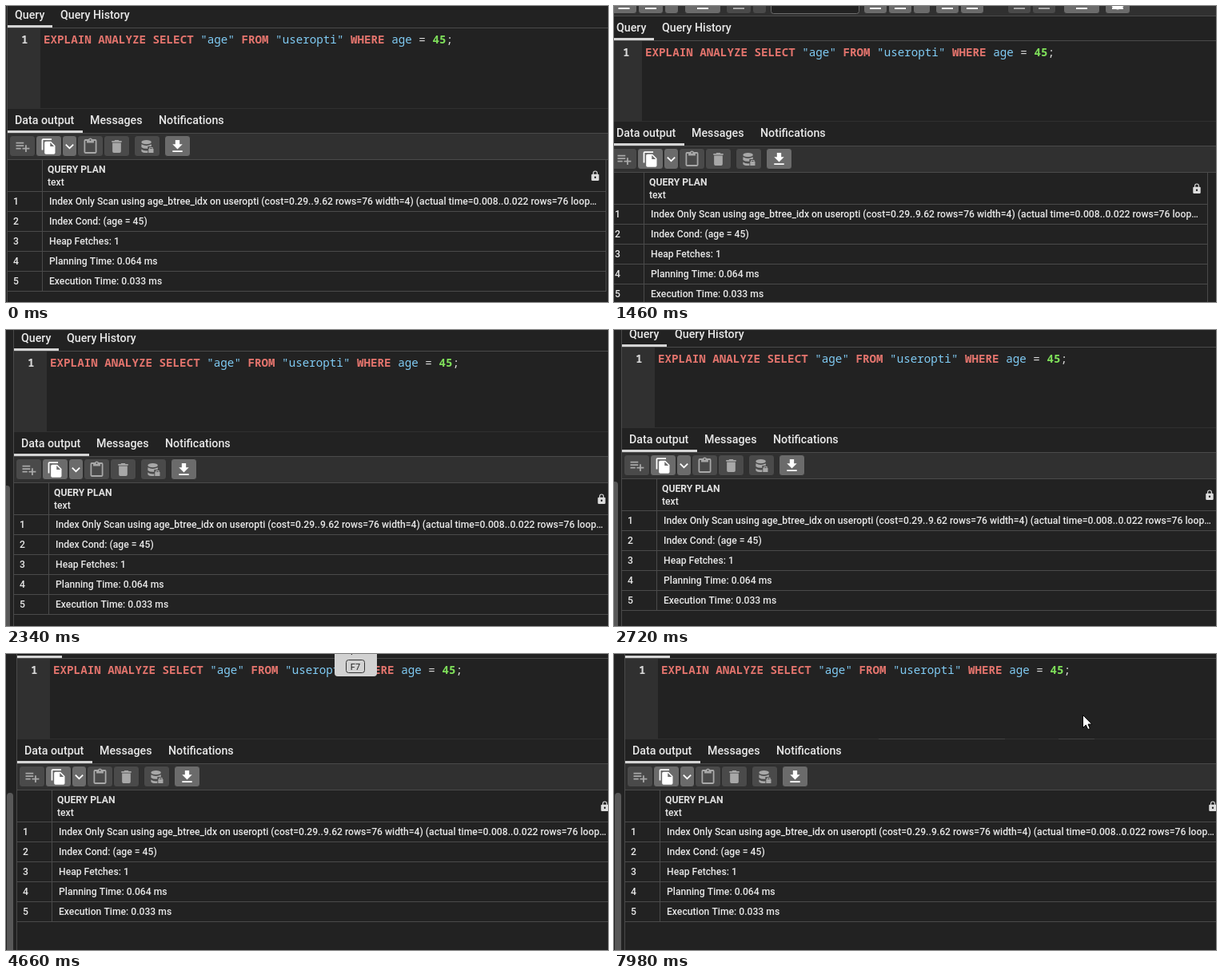
Animation of 753 by 371 pixels, one loop 8000 ms. Source, as an HTML page with a canvas:

```html
<!DOCTYPE html>
<html>
<head>
<meta charset="utf-8">
<style>
  html, body { margin: 0; width: 100%; height: 100%; overflow: hidden; background: #222; }
  canvas { display: block; }
</style>
</head>
<body>
<canvas id="stage" width="753" height="371"></canvas>
<script>
const ctx = document.getElementById('stage').getContext('2d');
const LOOP = 8000;
const SANS = 'Roboto, sans-serif';
const MONO = '"Noto Sans Mono", monospace';
const TAB_SIZE = 14.22, GRID_SIZE = 12.17;
const LINE = '#4a4a4a', BAR = '#303030', EDGE = '#2e2e2e', ACTIVE = '#6b6b6b', DISABLED = '#4a4a4a';
const KEYWORD = '#e3746d', NAME = '#80ccf5', NUMBER = '#7fe05a', PLAIN = '#d8d8d8';

// Each entry holds from its start time until the next one.
const pan = [
  [0, 0, 0], [1460, -8, 16], [1890, -3, 9], [2040, 4, 2],
  [2340, 8, -1], [2720, 8, -6], [2860, 11, -15], [2980, 12, -22]
];
const pointer = [
  [0], [290, 'arrow', 252, -2], [450, 'arrow', 227, 0], [580],
  [730, 'arrow', 238, -12], [880],
  [6550, 'move', 475.5, 134.5], [6690, 'arrow', 477, 182], [6830, 'arrow', 440, 90],
  [6960, 'arrow', 404, -3], [7080, 'arrow', 500, 30], [7200, 'arrow', 588, 92], [7320],
  [7460, 'arrow', 585, 149], [7580, 'move', 566, 133], [7700], [7980, 'arrow', 586, 76]
];
const tooltip = [
  [0], [4660, 411, 53, 'Explain', 'F7'], [4950], [5080, 330, 94, 'Execute query', 'F5'], [6550]
];
const at = (track, t) => track.filter(entry => entry[0] <= t).pop();

const rows = [
  'Index Only Scan using age_btree_idx on useropti (cost=0.29..9.62 rows=76 width=4) (actual time=0.008..0.022 rows=76 loop…',
  'Index Cond: (age = 45)',
  'Heap Fetches: 1',
  'Planning Time: 0.064 ms',
  'Execution Time: 0.033 ms'
];
const code = [
  ['EXPLAIN ANALYZE SELECT ', KEYWORD, 700], ['"age" ', NAME], ['FROM ', KEYWORD, 700],
  ['"useropti" ', NAME], ['WHERE ', KEYWORD, 700], ['age ', NAME], ['= ', PLAIN],
  ['45', NUMBER, 700], [';', PLAIN]
];
// Filled outlines in a 24 by 24 box
const icons = {
  addRow: 'M14 10H3v2h11zM14 6H3v2h11zM18 14v-4h-2v4h-4v2h4v4h2v-4h4v-2zM3 16h7v-2H3z',
  copy: 'M16 1H4Q2 1 2 3V17H4V3H16ZM15 5L21 11V21Q21 23 19 23H8Q6 23 6 21V7Q6 5 8 5ZM14 12H19.5L14 6.5Z',
  chevron: 'M7.4 8.6L12 13.2L16.6 8.6L18 10L12 16L6 10Z',
  paste: 'M19 2H14.8A3 3 0 0 0 9.2 2H5Q3 2 3 4V20Q3 22 5 22H19Q21 22 21 20V4Q21 2 19 2ZM12 2A1 1 0 0 1 12 4A1 1 0 0 1 12 2ZM19 20H5V4H7V7H17V4H19Z',
  trash: 'M6 19Q6 21 8 21H16Q18 21 18 19V7H6ZM19 4H15.5L14.5 3H9.5L8.5 4H5V6H19Z',
  database: 'M4 6A7 3 0 0 1 18 6A7 3 0 0 1 4 6ZM4 9Q11 13 18 9V12H13V15Q7 15.5 4 13ZM4 16Q7 18.5 13 18V21Q6 21.5 4 19ZM14 15.5H15V13H20V15.5H21V21H14ZM16.2 15.5H18.8V14.2H16.2Z',
  download: 'M19 9H15V3H9V9H5L12 16ZM5 18V20H19V18Z',
  lock: 'M18 8H17V6A5 5 0 0 0 7 6V8H6Q4 8 4 10V20Q4 22 6 22H18Q20 22 20 20V10Q20 8 18 8ZM12 17A2 2 0 0 1 12 13A2 2 0 0 1 12 17ZM15.1 8H8.9V6A3.1 3.1 0 0 1 15.1 6Z'
};
// Left, width, icon, enabled
const buttons = [
  [4, 33, 'addRow', 0], [37, 33, 'copy', 1], [70, 19, 'chevron', 1], [89, 33, 'paste', 0],
  [122, 33, 'trash', 0], [160, 33, 'database', 0], [198, 33, 'download', 1]
];
const topButtons = [
  [4, 33, 1], [38, 32, 1], [71, 18, 1], [96, 46, 1], [148, 32, 0], [181, 18, 0],
  [320, 30, 1], [351, 30, 1], [382, 22, 1], [410, 30, 1], [441, 30, 1],
  [500, 30, 0], [531, 30, 0], [570, 46, 1], [622, 32, 1]
];
const arrowPath = new Path2D('M.5 .5V16.5L4.3 13L6.8 18.6L9.4 17.5L7 12H11.8Z');
const movePath = new Path2D('M0 -10.5L4 -6H1.5V-1.5H6V-4L10.5 0L6 4V1.5H1.5V6H4L0 10.5L-4 6H-1.5V1.5H-6V4L-10.5 0L-6 -4V-1.5H-1.5V-6H-4Z');

function rect(x, y, w, h, color) {
  ctx.fillStyle = color;
  ctx.fillRect(x, y, w, h);
}

function roundRect(x, y, w, h, r, fill, stroke) {
  ctx.beginPath();
  ctx.roundRect(x, y, w, h, r);
  if (fill) { ctx.fillStyle = fill; ctx.fill(); }
  if (stroke) { ctx.strokeStyle = stroke; ctx.lineWidth = 1; ctx.stroke(); }
}

function text(str, x, y, size, color = '#e8e8e8', weight = 500, family = SANS, align = 'left') {
  ctx.font = `${weight} ${size}px ${family}`;
  ctx.fillStyle = color;
  ctx.textAlign = align;
  ctx.fillText(str, x, y);
}

function icon(name, x, y, color, size = 21.33) {
  ctx.save();
  ctx.translate(x, y);
  ctx.scale(size / 24, size / 24);
  ctx.translate(-12, -12);
  ctx.fillStyle = color;
  ctx.fill(new Path2D(icons[name]), 'evenodd');
  ctx.restore();
}

function button(x, y, w, enabled) {
  roundRect(x + .5, y + .5, w - 1, 26, 3.5, enabled ? ACTIVE : DISABLED, EDGE);
}

function drawTopBar() {
  rect(2, -50, 760, 46, BAR);
  rect(2, -4, 760, 1, LINE);
  for (const [x, w, enabled] of topButtons) {
    button(x, -33, w, enabled);
    const color = enabled ? '#fff' : '#a8a8a8';
    if (w < 25) icon('chevron', x + w / 2, -20, color);
    else rect(x + w / 2 - 7, -14, 14, 2, color);
  }
  roundRect(204.5, -33.5, 110, 27, 3, '#222', ACTIVE);
  ctx.beginPath();
  ctx.arc(638, -20, 8.5, 0, 7);
  ctx.fillStyle = '#fff';
  ctx.fill();
}

function drawEditor() {
  text('Query', 11, 16, TAB_SIZE);
  text('Query History', 68, 16, TAB_SIZE);
  rect(2, 27, 760, 1, LINE);
  rect(2, 24, 56, 3, '#d5d5d5');
  rect(2, 28, 41, 100, BAR);
  text('1', 19, 47, TAB_SIZE, PLAIN, 600, MONO);
  let x = 47;
  for (const [str, color, weight = 500] of code) {
    text(str, x, 47, TAB_SIZE, color, weight, MONO);
    x += str.length * 8.533;
  }
  rect(2, 128, 760, 1, BAR);
}

function drawOutput() {
  text('Data output', 11, 148, TAB_SIZE);
  text('Messages', 105, 148, TAB_SIZE);
  text('Notifications', 191, 148, TAB_SIZE);
  rect(2, 159, 760, 33, BAR);
  rect(2, 159, 760, 1, LINE);
  rect(2, 156, 94, 3, '#d5d5d5');
  for (const [x, w, name, enabled] of buttons) {
    button(x, 162, w, enabled);
    icon(name, x + w / 2, 176, enabled ? '#fff' : '#a8a8a8');
  }
  rect(2, 192, 760, 1, LINE);
  text('QUERY PLAN', 52, 209, GRID_SIZE, '#e0e0e0', 700);
  text('text', 52, 225, GRID_SIZE);
  icon('lock', 737, 213, '#ddd', 14.2);
  rows.forEach((row, i) => {
    text(i + 1, 9, 249 + i * 25, GRID_SIZE);
    text(row, 54, 249 + i * 25, GRID_SIZE);
  });
  for (let y = 232; y <= 357; y += 25) rect(2, y, 749, 1, LINE);
  rect(45, 192, 1, 166, LINE);
  rect(750, 192, 1, 166, LINE);
}

function drawTooltip([, x, w, label, key]) {
  if (!label) return;
  const mid = x + w / 2;
  roundRect(x, -20, w, 48, 4, '#d2d2d2');
  text(label, mid, -2, GRID_SIZE, '#222', 400, SANS, 'center');
  roundRect(mid - 12, 7.5, 23, 16, 3, null, '#333');
  text(key, mid - .5, 20, 11, '#222', 400, SANS, 'center');
}

function drawPointer([, kind, x, y]) {
  if (!kind) return;
  const path = kind === 'arrow' ? arrowPath : movePath;
  ctx.save();
  ctx.translate(x, y);
  ctx.fillStyle = '#fff';
  ctx.strokeStyle = '#000';
  ctx.lineWidth = 1;
  ctx.fill(path);
  ctx.stroke(path);
  ctx.restore();
}

function draw(now) {
  const t = now % LOOP;
  const [, dx, dy] = at(pan, t);
  rect(0, 0, 753, 371, '#222');
  ctx.save();
  ctx.translate(dx, dy);
  roundRect(-11, 196, 8, 400, 4, '#585858');
  drawTopBar();
  drawEditor();
  drawOutput();
  rect(1, -50, 1, 500, LINE);
  ctx.restore();

  // Splitter lights up where the pointer has crossed it
  if (t >= 6550) rect(331, 106, t < 6690 ? 156 : 158, 1, '#424242');
  if (t >= 7200) rect(556, 106, 45, 1, '#424242');
  drawTooltip(at(tooltip, t));
  drawPointer(at(pointer, t));
}

const start = performance.now();
function tick() {
  draw(performance.now() - start);
  requestAnimationFrame(tick);
}
tick();
</script>
</body>
</html>
```
